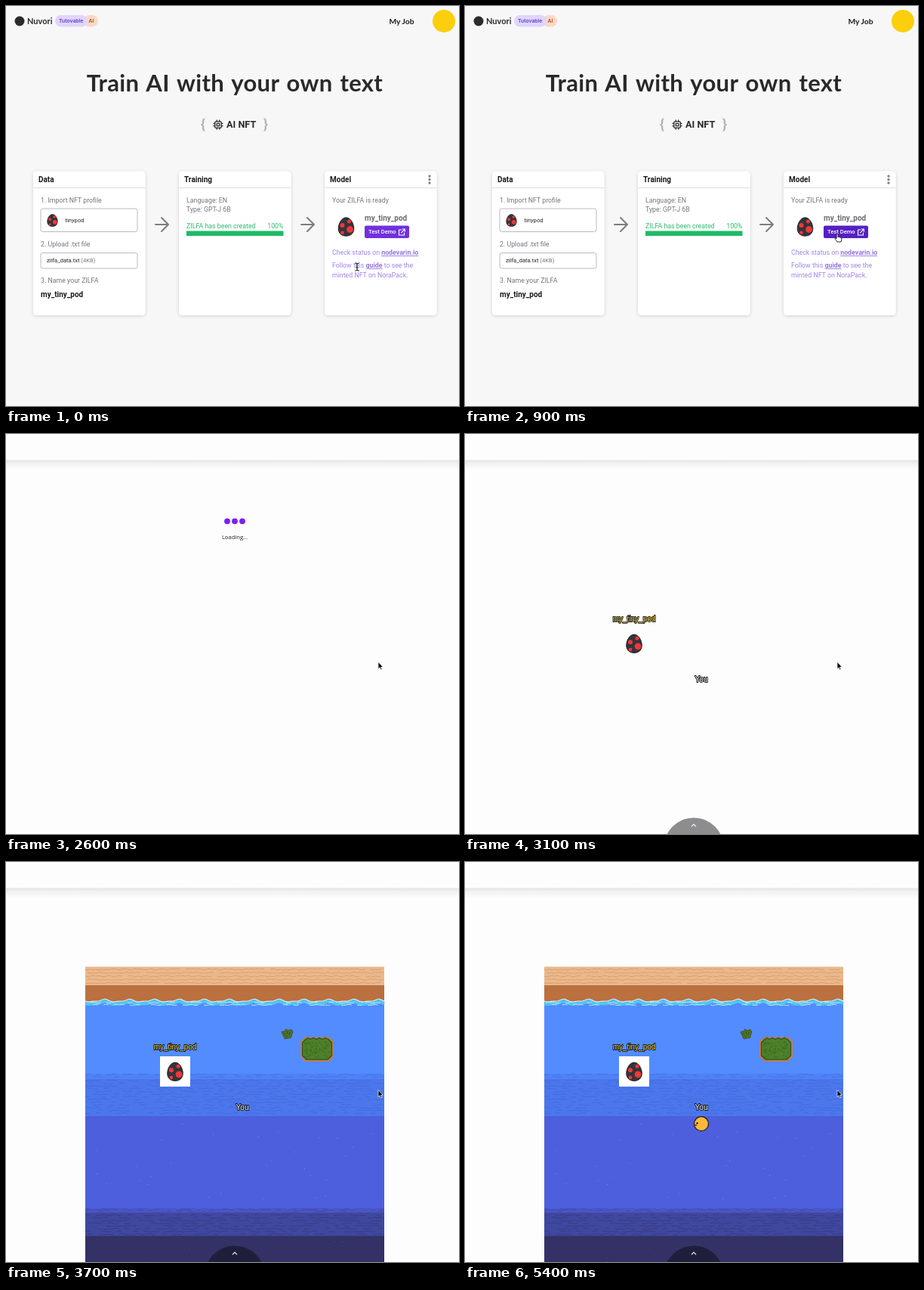
An HTML page that plays this animation: 600x529 px, repeating every 5.5 s.

```html
<!DOCTYPE html>
<html lang="en">
<head>
<meta charset="utf-8">
<title>Train AI with your own text</title>
<style>
  html, body { margin: 0; width: 100%; height: 100%; overflow: hidden; background: #fdfdfd; }
  svg { display: block; width: 600px; height: 529px; font: 8.8px Roboto, sans-serif; }
  .h1 { font: 700 31px Lato, sans-serif; fill: #29292b; letter-spacing: .35px; word-spacing: 2px; }
  .nav { font: 700 10.3px Lato, sans-serif; fill: #1c1c1e; }
  .brand { font: 700 11px Lato, sans-serif; fill: #2b2b2e; }
  .pill { font: 600 6.8px Inter, sans-serif; }
  .mode { font-weight: 700; font-size: 12.7px; fill: #2a2a2c; }
  .brace { font: 700 18px Roboto, sans-serif; fill: #b2b2b4; }
  .title, .name { font-weight: 700; font-size: 10px; fill: #1b1b1d; }
  .name.dim { fill: #6c6d73; }
  .note { fill: #75767b; }
  .field { font-size: 7.6px; fill: #222; }
  .box { fill: #fff; stroke: #b9b9c2; }
  .done { fill: #2cba6c; }
  .info { fill: #a084e8; }
  .link { font-weight: 700; fill: #9675de; text-decoration: underline; }
  .btn { font-weight: 500; font-size: 7.6px; fill: #fff; }
  .load { font: 7.6px "Open Sans", sans-serif; fill: #222; }
  .tag { font: 10px "Liberation Sans", Arial, sans-serif; text-anchor: middle;
         stroke: #111; stroke-width: 1.8px; stroke-linejoin: round; paint-order: stroke; }
  .line { fill: none; stroke-linecap: round; stroke-linejoin: round; }
</style>
</head>
<body>
<svg viewBox="0 0 600 529">
  <defs>
    <filter id="soft" x="-10%" y="-10%" width="120%" height="120%">
      <feDropShadow dx="0" dy="1" stdDeviation="2" flood-color="#000" flood-opacity=".16"/>
    </filter>
    <linearGradient id="fade" x2="0" y2="1">
      <stop offset="0" stop-color="#e4e4e4"/>
      <stop offset=".35" stop-color="#f2f2f2"/>
      <stop offset="1" stop-color="#fdfdfd"/>
    </linearGradient>
    <g id="egg">
      <path d="M0-12.2C6-12.2 10.3-4 10.3 2.2C10.3 8.6 6 12.2 0 12.2S-10.3 8.6-10.3 2.2C-10.3-4-6-12.2 0-12.2Z" fill="#343438" stroke="#1d1d20" stroke-width=".9"/>
      <g fill="#f2373b">
        <circle cx="-5" cy="-2" r="3"/><circle cx="4" cy="-7" r="2.5"/>
        <circle cx="5" cy="3.5" r="4.4"/><circle cx="-5" cy="7.8" r="2.3"/>
      </g>
    </g>
    <g id="card">
      <rect y="218.500" width="148.500" height="190.500" rx="4.500" fill="#fff" filter="url(#soft)"/>
      <path d="M0 240.500h148.500" stroke="#dedee0"/>
    </g>
    <path id="arrow" class="line" d="M1 289H18M9 280L18 289L9 298" stroke="#7d7d80" stroke-width="2"/>
  </defs>

  <g id="home">
    <rect width="600" height="529" fill="#f7f7f8"/>
    <circle cx="18" cy="20" r="6.500" fill="#2b2b2e"/>
    <text class="brand" x="28" y="24">Nuvori</text>
    <rect x="103" y="12" width="19" height="15.500" rx="7.750" fill="#fbd9c4"/>
    <rect x="65" y="12" width="43" height="15.500" rx="7.750" fill="#e0d5fb"/>
    <text class="pill" x="70" y="22.300" fill="#5d3fc6">Tutovable</text>
    <text class="pill" x="109.500" y="22.300" fill="#b0452c">AI</text>
    <text class="nav" x="507.500" y="23.500">My Job</text>
    <circle cx="580" cy="20" r="15" fill="#fbcf0c"/>

    <text class="h1" x="303" y="113" text-anchor="middle">Train AI with your own text</text>
    <text class="brace" x="258" y="163">{</text>
    <text class="brace" x="341" y="163">}</text>
    <g class="line" stroke="#2a2a2c" stroke-width="1.300">
      <rect x="276.800" y="152.800" width="8.400" height="8.400" rx="1"/>
      <rect x="279.300" y="155.300" width="3.400" height="3.400"/>
      <path d="M279.300 151v1.500M282.700 151v1.500M279.300 161.500v1.500M282.700 161.500v1.500M275 155.300h1.500M275 158.700h1.500M285.500 155.300h1.500M285.500 158.700h1.500"/>
    </g>
    <text class="mode" x="292" y="161.300">AI NFT</text>

    <use href="#card" x="36"/><use href="#card" x="229"/><use href="#card" x="422"/>
    <use href="#arrow" x="197"/><use href="#arrow" x="390"/>

    <text class="title" x="43" y="233">Data</text>
    <text class="note" x="46" y="260">1. Import NFT profile</text>
    <rect class="box" x="46" y="268" width="128" height="30.500" rx="2.500"/>
    <use href="#egg" transform="translate(61.500 283.500) scale(.66)"/>
    <text class="field" x="78.500" y="286">tinypod</text>
    <text class="note" x="46" y="318">2. Upload .txt file</text>
    <rect class="box" x="46" y="326.500" width="128" height="20.500" rx="2.500"/>
    <text class="field" x="54" y="339.300">zilfa_data.txt <tspan fill="#77787d">(4KB)</tspan></text>
    <text class="note" x="46" y="366">3. Name your ZILFA</text>
    <text class="name" x="46" y="385">my_tiny_pod</text>

    <text class="title" x="236" y="233">Training</text>
    <text class="note" x="239" y="260">Language: EN</text>
    <text class="note" x="239" y="272">Type: GPT-J 6B</text>
    <text class="done" x="239" y="294">ZILFA has been created</text>
    <text class="done" x="367.500" y="294" text-anchor="end">100%</text>
    <rect x="239" y="297.500" width="128.500" height="6.500" fill="#20bb66"/>

    <text class="title" x="429" y="233">Model</text>
    <g fill="#85858a">
      <circle cx="561" cy="225" r="1.700"/><circle cx="561" cy="229.500" r="1.700"/><circle cx="561" cy="234" r="1.700"/>
    </g>
    <text class="note" x="432" y="260">Your ZILFA is ready</text>
    <use href="#egg" transform="translate(450.500 292)"/>
    <text class="name dim" x="475" y="284">my_tiny_pod</text>
    <rect id="button" x="475" y="290.500" width="59" height="16.500" rx="2"/>
    <text class="btn" x="480" y="301.300">Test Demo</text>
    <path class="line" d="M523.500 296H520.500V303H527.500V300M525 295H528.300V298.300M528 295.300L523.500 299.800" stroke="#fff" stroke-width="1.100"/>
    <text class="info" x="432" y="329">Check status on <tspan class="link">nodevarin.io</tspan></text>
    <text class="info" x="432" y="346">Follow this <tspan class="link">guide</tspan> to see the</text>
    <text class="info" x="432" y="358.500">minted NFT on NoraPack.</text>
  </g>

  <g id="demo">
    <rect width="600" height="529" fill="#fdfdfd"/>
    <g id="frame">
      <rect y="34.500" width="600" height="13" fill="url(#fade)"/>
    </g>
    <g id="loader">
      <g id="dots" fill="#7c20f2">
        <circle cx="293" cy="115.300"/><circle cx="303" cy="115.300"/><circle cx="313" cy="115.300"/>
      </g>
      <text class="load" x="303" y="139" text-anchor="middle">Loading...</text>
    </g>
    <g id="game">
      <g id="map"></g>
      <use href="#egg" x="224" y="277.300"/>
      <text class="tag" x="224" y="248" fill="#f7dc4e">my_tiny_pod</text>
      <text class="tag" x="313" y="327.500" fill="#fff">You</text>
      <g id="player">
        <circle cx="313" cy="346.200" r="9.500" fill="#ffb83c" stroke="#1d1a18" stroke-width="1.200"/>
        <circle cx="307.500" cy="345.500" r="1.200" fill="#1d1a18"/>
        <path d="M303.700 347.200l3.300 .8l-2.600 1.600z" fill="#e0701c" stroke="#1d1a18" stroke-width=".6"/>
      </g>
      <circle id="tab" cx="303" cy="547" r="39.600"/>
      <path class="line" d="M300.300 518.800L303 516.200L305.700 518.800" stroke="#fff" stroke-width="1.100"/>
    </g>
  </g>

  <g id="cursor">
    <path id="beam" class="line" d="M-2.500-5Q0-5 0-3.500Q0-5 2.500-5M0-3.500V3.500M-2.500 5Q0 5 0 3.500Q0 5 2.500 5M-1.300 1H1.300" stroke="#222" stroke-width="1.100"/>
    <path id="point" d="M0 0L0 9.200L2.100 7.300L3.500 10.500L5 9.800L3.600 6.800L6.300 6.600Z" fill="#000" stroke="#fff" stroke-width=".7"/>
    <path id="hand" d="M-.9.900Q-.9-.3 0-.3T1 .9V4Q2.300 3.400 2.800 4.300Q4 3.900 4.400 4.900Q5.900 4.700 5.900 6.200Q5.900 8.500 5 10.500H0Q-.8 8.800-2.600 7Q-3.400 5.900-2.600 5.500Q-1.800 5.300-.9 6.300Z" fill="#fff" stroke="#111" stroke-width=".9" stroke-linejoin="round"/>
  </g>
</svg>
<script>
const $ = id => document.getElementById(id);
const LOOP = 5500, STEP = 100;
const T = { move: 0, rest: 600, blank: 1500, load: 2600, game: 3000, map: 3700, player: 3800 };

let seed = 11;
const rand = () => (seed = seed * 16807 % 2147483647) / 2147483647;

function buildMap() {
  const L = 105, R = 501, W = R - L;
  const parts = [];
  const rect = (x, y, w, h, fill) =>
    parts.push(`<rect x="${x}" y="${y}" width="${w}" height="${h}" fill="${fill}"/>`);
  const path = (d, stroke, width = 1, fill = "none") =>
    parts.push(`<path d="${d}" stroke="${stroke}" stroke-width="${width}" fill="${fill}"/>`);

  // rows of short scallops with random gaps
  function ripples(top, bottom, gap, chance, stroke) {
    let d = "";
    for (let y = top, row = 0; y < bottom; y += gap, row++)
      for (let x = L + row % 2 * 3; x < R - 7; x += 7)
        if (rand() < chance) d += `M${x} ${y}q3 ${rand() < .5 ? 1.6 : -1.6} 6.500 0`;
    path(d, stroke);
  }
  function shore(base, amp) {
    let d = "";
    for (let x = L; x <= R; x += 3) {
      const a = (x - L) / 33 * 2 * Math.PI;
      d += `${d ? "L" : "M"}${x} ${(base + amp * Math.sin(a) + amp * .5 * Math.sin(2 * a + 1)).toFixed(1)}`;
    }
    return d;
  }

  rect(L, 138.5, W, 25, "#ebb88b");
  ripples(142, 162, 4.5, .92, "#d79f70");
  rect(L, 163, W, 22, "#ba703f");
  path(shore(184, 1.5) + `V280H${L}Z`, "none", 0, "#528cff");
  path(shore(186.5, 1.5), "#4fc8ee", 4);
  path(shore(183.5, 1.5), "#d9eef2", 1.2);
  ripples(186, 190, 3, .6, "#b5e9f5");

  rect(L, 190, W, 92, "#528cff");
  rect(L, 286, W, 51, "#4b77ec");
  rect(L, 280, W, 7, "#4f82f6");
  ripples(281, 287, 3, .6, "#4a72e6");
  ripples(289, 335, 3.6, .55, "#456ade");

  rect(L, 336, W, 123, "#4d5fdc");
  rect(L, 458, W, 7, "#4650b8");
  ripples(459, 464, 3, .7, "#4d5fdc");
  rect(L, 464, W, 31, "#3f489f");
  ripples(467, 494, 3.6, .6, "#363c82");
  rect(L, 494.5, W, 35, "#333165");

  for (let i = 0; i < 30; i++)
    rect((L + rand() * W).toFixed(0), (342 + rand() * 112).toFixed(0), 1, 1, "#7187ee");
  for (let i = 0; i < 6; i++)
    rect((L + rand() * W).toFixed(0), (500 + rand() * 24).toFixed(0), 1, 1, "#4b4a8c");

  // islands
  path("M396 232.500H428L433 238V257L427 263H397L391 257V238Z", "#c9784a", 2, "#4b7d28");
  path("M397 234.500l3-2l3 2l4-2l4 2l4-2l4 2l4-2l4 2L431.500 239V256L426 261H398L392.500 256V239Z", "#2f5220", 1.2, "#4d8029");
  let grass = "";
  for (let i = 0; i < 70; i++)
    grass += `M${(395 + rand() * 33).toFixed(1)} ${(237 + rand() * 20).toFixed(1)}l1 2`;
  path(grass, "#3a6620", 1);
  path("M365 224.500l4-.5l2-3l3 2l4-1.500l2 3.500l-1.500 3l-1 4.500l-4 .5l-4 1l-2-4Z", "#5b4527", 1, "#467527");
  path("M368 226l2 3M372 224l1 4M376 225l-1 4M371 230l2 1", "#31571d", 1);

  rect(204, 257, 40, 40, "#fff");
  $("map").innerHTML = parts.join("");
}

const show = (id, on) => $(id).setAttribute("visibility", on ? "inherit" : "hidden");
const ease = p => p * p * (3 - 2 * p);
const dots = [...$("dots").children];

function draw(t) {
  const home = t < T.blank;
  show("home", home);
  show("demo", !home);
  show("frame", t >= T.load);
  show("loader", t >= T.load && t < T.game);
  show("game", t >= T.game);
  show("map", t >= T.map);
  show("player", t >= T.player);
  $("tab").setAttribute("fill", t < T.map ? "#8d8d90" : "#201f3b");

  dots.forEach((dot, i) => {
    const wave = Math.sin((t - T.load) / 750 * 2 * Math.PI - i * .6 * (t > T.load));
    dot.setAttribute("r", (3.9 - 1.2 * Math.max(0, wave)).toFixed(2));
  });

  const p = ease(Math.min(1, Math.max(0, (t - T.move) / (T.rest - T.move))));
  const x = 465 + 28 * p, y = 345 - 43.5 * p;
  const hover = home && y < 307;
  const text = home && (y > 338 || (y > 321 && y < 331));
  $("cursor").setAttribute("transform", `translate(${x.toFixed(1)} ${y.toFixed(1)})`);
  show("hand", hover);
  show("beam", text);
  show("point", !hover && !text);
  $("button").setAttribute("fill", hover ? "#5520c4" : "#7030de");
}

function tick() {
  const t = performance.now() % LOOP;
  draw(Math.floor(t / STEP) * STEP);
  requestAnimationFrame(tick);
}

buildMap();
tick();
</script>
</body>
</html>
```
